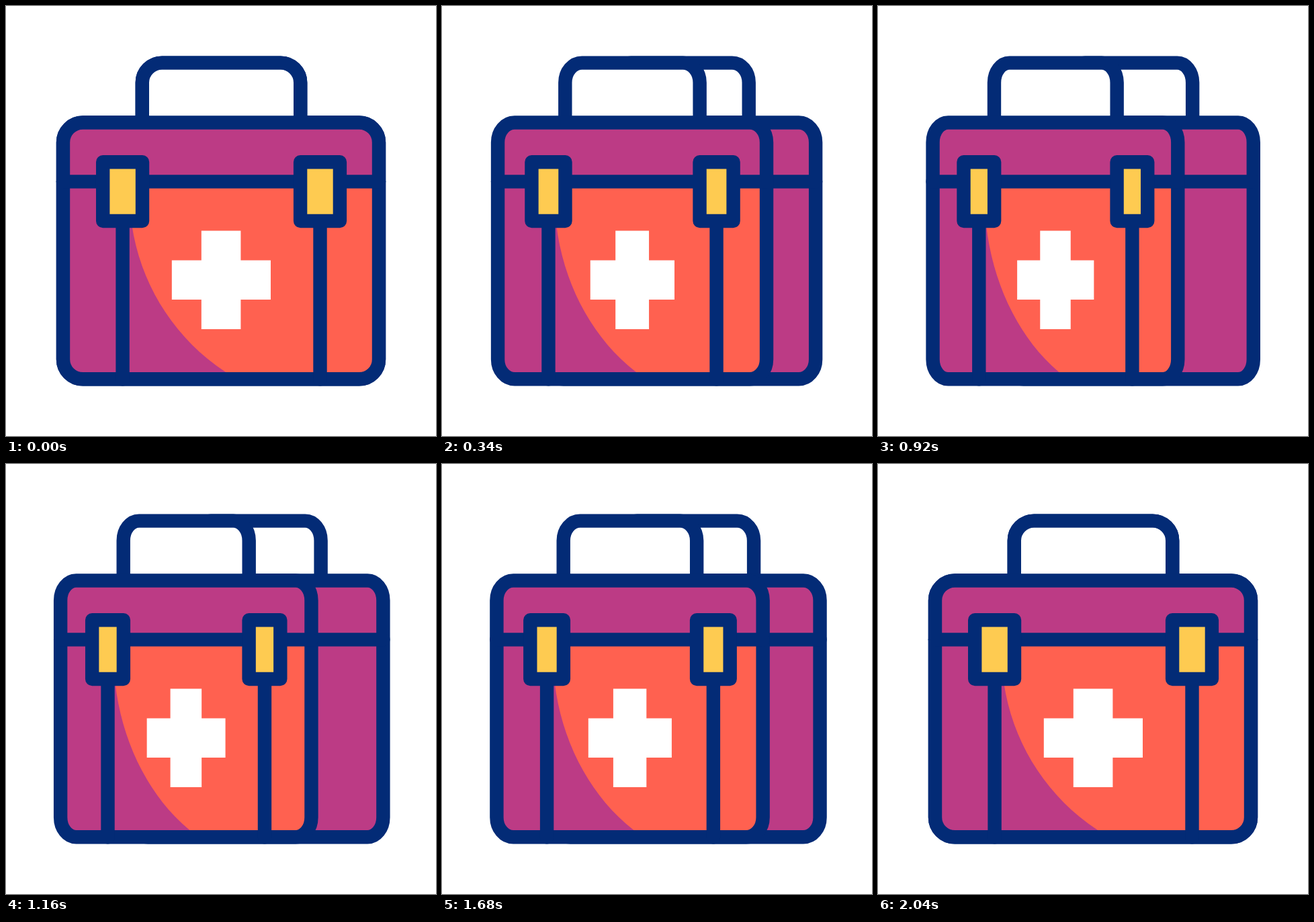
Write an HTML page with a canvas that moves like this. It is 640 px wide and 640 px high and loops after 2400 ms.

```html
<!DOCTYPE html>
<html>
<head>
<meta charset="utf-8">
<style>
  html, body { margin: 0; width: 100%; height: 100%; overflow: hidden; background: #fff; }
  canvas { display: block; }
</style>
</head>
<body>
<canvas id="stage" width="640" height="640"></canvas>
<script>
const ctx = document.getElementById('stage').getContext('2d');
const NAVY = '#032b76', PURPLE = '#bc3b85', ORANGE = '#ff6150', YELLOW = '#fecb51', WHITE = '#fff';
const LEFT = 85, RIGHT = 555, WIDTH = RIGHT - LEFT, LID = 261.4;
const LOOP = 2400;

// time, horizontal scale, front left edge, back right edge
const KEYS = [
  [0, 1, 85, 555],
  [583, 0.762, 81.9, 556.8],
  [1560, 0.8128, 80.7, 564],
  [2035, 1, 85, 555]
];

function pose(t) {
  const i = KEYS.findIndex(k => k[0] > t);
  if (i < 0) return KEYS[3].slice(1);
  const a = KEYS[i - 1], b = KEYS[i];
  const u = (t - a[0]) / (b[0] - a[0]);
  const e = u * u * (3 - 2 * u);
  return a.slice(1).map((v, j) => v + (b[j + 1] - v) * e);
}

// Builds shapes squeezed horizontally while the outline keeps its weight.
function pen(left, scale) {
  const trace = build => {
    ctx.beginPath();
    ctx.setTransform(scale, 0, 0, 1, left - LEFT * scale, 0);
    build();
    ctx.resetTransform();
  };
  return (build, fill, outlined) => {
    trace(build);
    if (fill) { ctx.fillStyle = fill; ctx.fill(); }
    if (outlined) ctx.stroke();
  };
}

const line = (x1, y1, x2, y2) => () => { ctx.moveTo(x1, y1); ctx.lineTo(x2, y2); };
const rect = (x, y, w, h) => () => ctx.rect(x, y, w, h);
const body = () => ctx.roundRect(LEFT, 173.5, WIDTH, 381.8, 29.4);
const orangeSide = () => ctx.ellipse(501, 280, 317, 317, 0, 0, 7);
const handle = () => {
  ctx.moveTo(202.8, 173.5);
  ctx.lineTo(202.8, 114);
  ctx.arc(232.2, 114, 29.4, Math.PI, Math.PI * 1.5);
  ctx.arc(408.8, 114, 29.4, -Math.PI / 2, 0);
  ctx.lineTo(438.2, 173.5);
};

function drawCase(left, scale, front) {
  const draw = pen(left, scale);
  draw(handle, WHITE, true);
  draw(body, PURPLE);
  if (front) {
    ctx.save();
    ctx.clip();
    ctx.beginPath();
    ctx.rect(0, LID, 640, 640);
    ctx.clip();
    draw(orangeSide, ORANGE);
    ctx.restore();
  }
  draw(body, null, true);
  draw(line(LEFT, LID, RIGHT, LID), null, true);
  if (!front) return;
  for (const x of [173.6, 467.5]) {
    draw(line(x, 320, x, 555.3), null, true);
    draw(rect(x - 29.4, 232.2, 58.8, 87.8), YELLOW, true);
  }
  draw(rect(246.8, 378.4, 147.2, 58.6), WHITE);
  draw(rect(290.8, 334.6, 58.6, 146.4), WHITE);
}

function render(t) {
  const [scale, left, right] = pose(t);
  ctx.fillStyle = WHITE;
  ctx.fillRect(0, 0, 640, 640);
  ctx.strokeStyle = NAVY;
  ctx.lineWidth = 20.4;
  ctx.lineCap = ctx.lineJoin = 'round';
  drawCase(right - WIDTH * scale, scale, false);
  drawCase(left, scale, true);
}

const start = performance.now();
function tick() {
  render((performance.now() - start) % LOOP);
  requestAnimationFrame(tick);
}
tick();
</script>
</body>
</html>
```
